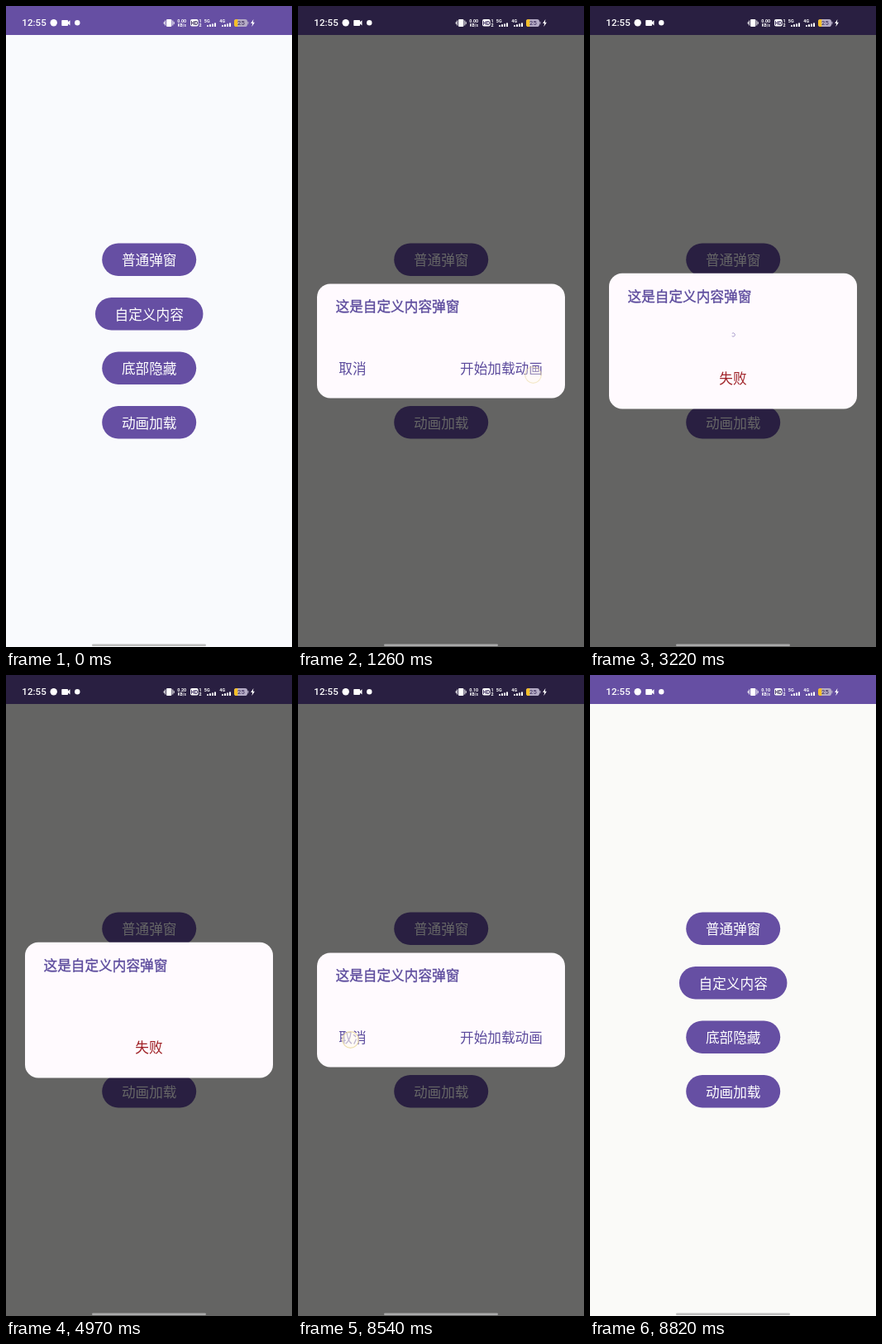
These frames come from a looping animation (346x774 px, 9030 ms). An HTML page:

```html
<!DOCTYPE html>
<html lang="zh-CN">
<head>
<meta charset="utf-8">
<style>
html, body { margin: 0; width: 100%; height: 100%; overflow: hidden; background: #f9fafd; }
svg { display: block; width: 346px; height: 774px; }
text { font: 16.67px "Noto Sans CJK SC", "Noto Sans CJK", "Noto Sans", sans-serif; }
.mid { text-anchor: middle; }
.status text { font-family: Roboto, sans-serif; fill: #fff; font-weight: 700; }
.status .clock { font-size: 11.6px; font-weight: 500; }
.status .tiny { font-size: 5.4px; }
#title { stroke: #5c4b9d; stroke-width: .35px; }
</style>
</head>
<body>
<svg viewBox="0 0 346 774">
  <rect id="page" width="346" height="774"/>
  <rect width="346" height="35" fill="#664fa3"/>
  <g id="menu"></g>
  <rect id="dim" width="346" height="774"/>

  <g class="status" fill="#fff">
    <text class="clock" x="19.3" y="24.3">12:55</text>
    <circle cx="57.7" cy="20.3" r="4.2"/>
    <path d="M68 17h6.3q.7 0 .7.7v1.5l2.5-2v6.3l-2.5-2v1.7q0 .7-.7.7H68q-.7 0-.7-.7v-5.5q0-.7.7-.7z"/>
    <circle cx="86.3" cy="20.3" r="3.2"/>
    <rect x="194" y="16" width="6.4" height="9" rx="1.2"/>
    <path d="M192.6 17.5v6M201.8 17.5v6M191.2 19v3M203.2 19v3" stroke="#fff" stroke-width=".9"/>
    <text id="speed" class="tiny mid" x="212.8" y="20">0.00</text>
    <text class="mid" x="212.8" y="25" style="font-size:4.6px">KB/s</text>
    <rect x="223" y="16" width="9.6" height="8.6" rx="2"/>
    <text class="mid" x="227.8" y="22.7" style="font-size:6.4px;fill:#3a2c5d">HD</text>
    <text class="tiny" x="233.4" y="19.8">1</text>
    <text class="tiny" x="233.4" y="25">2</text>
    <text class="tiny" x="239.8" y="20">5G</text>
    <text class="tiny" x="258.3" y="20">4G</text>
    <path id="bars"/>
    <clipPath id="cell"><rect x="276" y="16" width="16" height="9" rx="2.8"/></clipPath>
    <g clip-path="url(#cell)">
      <rect x="276" y="16" width="16" height="9" fill="#b5acc6"/>
      <rect x="276" y="16" width="4.3" height="9" fill="#f5bf28"/>
    </g>
    <rect x="292.3" y="18.8" width="1.1" height="3.4" rx=".5" fill="#b5acc6"/>
    <text class="mid" x="284.4" y="23.3" style="font-size:7.6px;font-weight:500;fill:#4b3d68">25</text>
    <path d="M299.4 16l-3.3 5h2l-.7 4 3.5-5.300h-2.100z"/>
  </g>

  <g id="dialog">
    <rect id="card" x="23" width="300" rx="16" fill="#fffafe"/>
    <g id="inner">
      <text id="title" x="45.500" y="369.300" fill="#5c4b9d">这是自定义内容弹窗</text>
      <g id="row" fill="#5c4b9d">
        <text x="49.300" y="443.500">取消</text>
        <text x="196" y="443.500">开始加载动画</text>
      </g>
    </g>
    <circle id="spinner" r="17" fill="none" stroke="#6650a4" stroke-width="4" pathLength="360"/>
    <text id="fail" class="mid" x="0" y="32.800">失败</text>
    <circle id="touch" r="9.800" fill="#fffaf0" fill-opacity=".6" stroke="#eedfae" stroke-width="1.200"/>
  </g>
  <rect id="nav" x="104" y="770.500" width="138" height="2.500" rx="1.200"/>
</svg>

<script>
const LOOP = 9030, STEP = 70;
const OPEN = 140, START = 1400, FAILED = 3040, RESET = 6500, SHRINK = 6840, CLOSE = 8560;
const $ = id => document.getElementById(id);
const set = (id, attrs) => {
  for (const key in attrs) $(id).setAttribute(key, attrs[key]);
};
const clamp = x => Math.min(1, Math.max(0, x));
const ramp = (t, from, to) => clamp((t - from) / (to - from));
const ease = x => { x = clamp(x); return x * x * (3 - 2 * x); };

// Remaining distance of a critically damped spring, 1 to 0.
const spring = ms => {
  if (ms <= 0) return 1;
  const x = ms * 0.02;
  return (1 + x) * Math.exp(-x);
};

const buttons = [["普通弹窗", 306.3, 114], ["自定义内容", 371.8, 130.5], ["底部隐藏", 437.3, 114], ["动画加载", 502.8, 114]];
$("menu").innerHTML = buttons.map(([label, y, w]) =>
  `<rect x="${173.2 - w / 2}" y="${y - 19.7}" width="${w}" height="39.400" rx="19.700" fill="#664fa3"/>
   <text class="mid" x="173.200" y="${y + 6.7}" fill="#fff">${label}</text>`).join("");

const bars = x => [0, 1, 2, 3].map(i => {
  const h = 1.8 + i * 0.9;
  return `M${x + i * 3} ${25 - h}h2v${h}h-2z`;
}).join("");
set("bars", { d: bars(243) + bars(261) });

function drawSpinner(t) {
  const age = t - START;
  const turn = Math.floor(age / 1332), c = age % 1332;
  const head = 290 * ease(c / 666), tail = 290 * ease((c - 666) / 666);
  const angle = -90 + 216 * turn + 286 * c / 1332 + tail;
  const length = Math.max(4, head - tail);
  const scale = spring(t - FAILED);
  const shown = t >= START && scale > 0.01;
  set("spinner", {
    transform: `translate(173.200 397) rotate(${angle}) scale(${scale})`,
    "stroke-dasharray": `${length} ${360 - length}`,
    opacity: shown ? 1 - spring(age) : 0
  });
}

function drawRow(t) {
  const leaving = t < RESET;
  const scale = leaving ? spring(t - START) : 1;
  const opacity = leaving ? +(scale > 0.01) : 1 - spring(t - RESET);
  set("row", {
    transform: `translate(173.200 437.500) scale(${scale}) translate(-173.200 -437.500)`,
    opacity
  });
}

function drawFail(t) {
  const scale = spring(t - RESET);
  set("fail", {
    transform: `translate(173 423.500) scale(${scale})`,
    fill: t >= RESET ? "#74696f" : "#9f2026",
    opacity: t < FAILED || scale < 0.01 ? 0 : 1 - spring((t - FAILED) * 1.6)
  });
}

function drawTouch(t) {
  const first = t >= 1260 && t < 1470, second = t >= 8400 && t < 8610;
  set("touch", {
    cx: second ? 63.5 : 284.5,
    cy: second ? 440.5 : 445.5,
    opacity: second ? 1 : first ? 0.65 : 0
  });
}

function draw(t) {
  const dim = 0.6 * ramp(t, OPEN, 420) * (1 - ramp(t, CLOSE, 8800));
  const tall = t >= START && t < SHRINK;
  set("page", { fill: t < 700 ? "#f9fafd" : "#fafaf8" });
  set("dim", { "fill-opacity": dim });
  set("nav", { fill: dim > 0.3 ? "#aaa" : "#bcbcbc" });
  set("dialog", { opacity: ramp(t, OPEN, 360) * (1 - ramp(t, CLOSE, 8730)) });
  set("card", { y: tall ? 322.8 : 335.5, height: tall ? 163.6 : 138 });
  set("inner", { transform: `translate(0 ${tall ? -12.5 : 0})` });
  $("speed").textContent = t < 4410 ? "0.00" : t < 7560 ? "0.20" : "0.10";
  drawRow(t);
  drawSpinner(t);
  drawFail(t);
  drawTouch(t);
}

const begin = performance.now();
function tick() {
  const t = (performance.now() - begin) % LOOP;
  draw(Math.floor(t / STEP) * STEP);
  requestAnimationFrame(tick);
}
tick();
</script>
</body>
</html>
```
